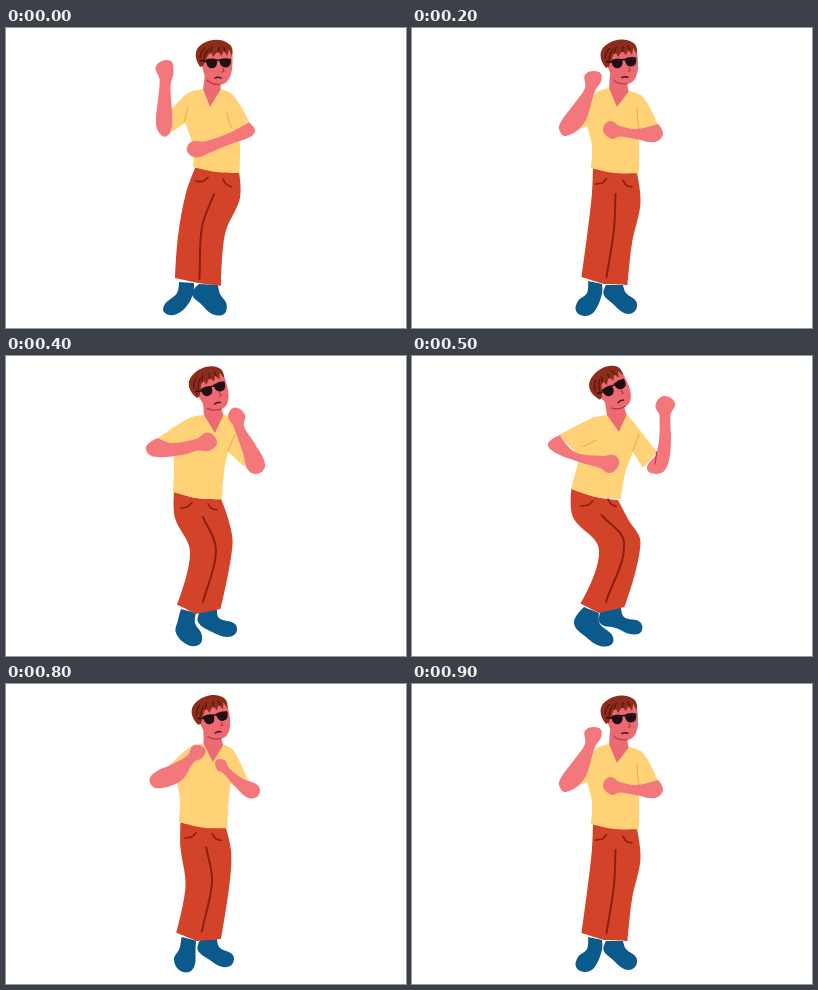
Recreate the animation shown at these times as an HTML page. Size 400x300 px, loop 1 s.

```html
<!DOCTYPE html>
<html lang="en">
<head>
<meta charset="utf-8">
<title>Dancing man</title>
<style>
  html, body { margin: 0; width: 100%; height: 100%; overflow: hidden; background: #fff; }
  svg { display: block; width: 400px; height: 300px; }
</style>
</head>
<body>
<svg id="stage" viewBox="0 0 400 300" stroke-linecap="round" stroke-linejoin="round">
  <defs>
    <g id="head">
      <path fill="#ec6a72" d="M-14-10L0-16 14-11C15-4 14.500 4 13.500 9C12 15 9 21 3 21.500C-4 22-10 18-13 14L-16 3Z"/>
      <path fill="#8c2d1c" d="M-18 4C-24-5-24-14-16-19C-6-25 5-24 11-19C15-16 15-12 14-7L11-13 9-7 6-12 3-7 0-12-5-6-7-11C-11-8-11-4-13-1L-15 3Z"/>
      <path fill="none" stroke="#5c140d" stroke-width="1.300" d="M-18-6Q-17-12-13-15M-14-4Q-13-10-9-14M-8-10L-6-16M0-11L1-16M7-12L6-16"/>
      <path fill="#211013" d="M-12-3.500Q-6-5.500-1-3.500Q0 5-6 5.300Q-12 5.500-12-3.500ZM1.500-4Q8-5.500 13-4Q13.500 4.500 7.500 4.600Q1.500 4.500 1.500-4Z"/>
      <path fill="none" stroke="#211013" stroke-width="1.400" d="M-17-2.500L-11-1.500M-2-2Q0-4 2-2"/>
      <path fill="none" stroke="#b9323d" stroke-width="1.100" d="M-11 17Q-6 22 2 21.500M5 5.500L6 8.500 4 9"/>
      <path fill="none" stroke="#54151c" stroke-width="1.500" d="M-3 15Q0 13.500 3 15"/>
    </g>
  </defs>
</svg>
<script>
const SKIN = '#f4777b', SHOE = '#0c5a8c', DARK = '#8c1f12', FOLD = '#f2b04a';

// Four key poses per part; "!" marks a sharp corner.
const parts = {
  shoeL: { fill: SHOE, poses: [
    '173,254! 188,255! 187,266 180,279 168,287 158,284 159,276 171,265',
    '176,253! 190,256! 190,266 182,284 172,288 164,283 166,273 175,265',
    '175,253! 190,257! 189,267 195.5,278 194,288 182,289 170,277 172,264',
    '172,251! 187,257! 188,268 200,279 200,288 188,290 174,281 162,267'] },
  shoeR: { fill: SHOE, poses: [
    '193,256! 212,257! 214,266 220.5,276 218,286 206,286 195,276 186,266',
    '194,257! 211,257! 214,265 224.5,274 222,284 212,285 200,275 191.5,266',
    '194,255! 211,253! 213,262 229,268 230,277 221,281 206,276 192,266',
    '190,252! 209,250! 212,261 228,266 229,276 218,278 204,272 188,267'] },
  pants: { fill: '#d2432a', poses: [
    '190,138! 211,143 233,144! 234,170 219,206 215,258! 192,255! 169,250! 172,208 180,165',
    '181,139! 203,144 225,145! 228.5,175 220,215 215.5,257! 192,256! 169.5,249! 175,208 180,165',
    '168,135! 190,142 215,143! 222,162 226.5,189 214.5,253! 190,258! 171,248.5! 184,196 169,162',
    '159.5,132! 184,141 206,144! 216,163 228.5,187 212.5,251! 187,257! 168.5,247.5! 187,194 161,161'] },
  seam: { line: DARK, width: 2, poses: [
    '208,166 196,199 193.5,251', '203.5,166 202,201 194.5,249',
    '197,161 210,194 197,246', '189.5,159 212,187 194,246'] },
  pocketL: { line: DARK, width: 1.6, poses: [
    '190,153 196,153.5 202,149.5', '183,156 190,155 194.5,150.5',
    '175,152 181,151 186,146.5', '169,150 176,149 181,144.5'] },
  pocketR: { line: DARK, width: 1.6, poses: [
    '217,151 220,156 225.5,159', '211,152 214,157 220,159',
    '202,148 205,152 211,154', '196,143 199,148 204,150.5'] },
  neck: { fill: '#ec6a72', poses: [
    '199,46! 214,50! 215,64! 204,80! 197,62!', '198,46! 214,50! 217,65! 205,80! 197,61!',
    '197,46! 214,50! 218,60! 209,78! 198,60!', '193,46! 211,48! 215,60! 207,77! 195,60!'] },
  head: { poses: ['212,35 0,0', '211.5,34.5 -5,0', '207,33 -17,0', '202,32 -27,0'] },
  shirt: { fill: '#ffd277', poses: [
    '197,61! 204,79! 215,61! 227,67 244,95! 235,104! 232,106! 234,118 233.5,145! 210,144 187,139! 187,118 179,95! 166,104! 165,82! 182,65',
    '197,60! 205,79! 217,63! 231,69 246,97! 235,103! 227,104! 227,122 227,145! 202,145 179,140! 180,118 175,98! 165,102! 168,88! 184,65',
    '198,59! 209,77! 218,58! 225,65 241,103! 238.5,110.5! 222,96! 218,116 216,143.5! 190,142 167,136! 168,115 167.5,100! 165,88! 151,83! 183,62',
    '195,59! 207,76! 215,58! 223,68 245,96! 231,112! 221,96! 213,118 209,143! 184,141 159,133! 163,118 167,105! 164,97! 147.5,79! 180,62'] },
  foldL: { line: FOLD, width: 1.2, poses: [
    '178,94 180,87 182,79', '', '', '169,91 177,88 184,84'] },
  foldR: { line: FOLD, width: 1.2, poses: [
    '221,85 223,93 226,100', '225,79 225.5,90 227,101',
    '222,95 225,87 229,79', '221,95 224,87 227,78'] },
  armL: { fill: SKIN, poses: [
    '152,103 160,108.5 166,98 164.5,58 167.5,44 164,32.5 150,38 153.5,51 152.5,68 150,90',
    '147,101 154,108 172,95 183,63 189.5,52 187,44 173.5,46 173,60 162,76 150,92',
    '140,91 147,100.5 178,98.5 192,94.5 204,94.5 211,86 202,76.5 190,83 165,87 152,82!',
    '136,88 144,97 170,107 188,112 198,117 207,108 203,99.5 191,100 163,96 148,79!'] },
  armR: { fill: SKIN, poses: [
    '249,102 244,109 222,117 203,125 190,129.5 181,123 185,114 198,113.5 221,106 243,94.5!',
    '251,106 243,114 224,111 207,108.5 200,111 191,102 198,93 208,98 224,101 246,96!',
    '253,117.5 242,114 237,97 227,69.5 222,60 229,51.5 239,59 238,70 249,88 259,108',
    '248,117.5 235,113 245,96 247.5,60 243.5,49 252,40 263,47 258.5,59 259,85 256,108'] },
  elbow: { line: '#b9323d', width: 1.1, poses: ['', '', '', '244.5,96 244,102 243,108'] }
};

const parse = s => s ? s.split(' ').map(p => {
  const [x, y] = p.split(',').map(parseFloat);
  return { x, y, sharp: p.endsWith('!') };
}) : [];

const mix = (a, b) => a.length === b.length ? a.map((p, i) => ({
  x: (p.x + b[i].x) / 2, y: (p.y + b[i].y) / 2, sharp: p.sharp && b[i].sharp
})) : [];

// Smooth curve through the points, with handles scaled to each segment.
function curve(pts, closed) {
  const n = pts.length;
  if (!n) return '';
  const at = i => closed ? pts[(i + n) % n] : pts[Math.max(0, Math.min(n - 1, i))];
  const handle = (i, len) => {
    const p = at(i), a = at(i - 1), b = at(i + 1);
    const k = p.sharp ? 0 : len * 0.35 / (Math.hypot(b.x - a.x, b.y - a.y) || 1);
    return [p.x + (b.x - a.x) * k, p.y + (b.y - a.y) * k];
  };
  let d = `M${pts[0].x} ${pts[0].y}`;
  for (let i = 0; i < n - (closed ? 0 : 1); i++) {
    const p = at(i), q = at(i + 1), len = Math.hypot(q.x - p.x, q.y - p.y);
    d += `C${handle(i, len)} ${handle(i + 1, -len)} ${q.x},${q.y}`;
  }
  return d + (closed ? 'Z' : '');
}

const stage = document.getElementById('stage');
function add(parent, tag, attrs) {
  const el = document.createElementNS('http://www.w3.org/2000/svg', tag);
  for (const k in attrs) el.setAttribute(k, attrs[k]);
  return parent.appendChild(el);
}

// Pose 2 lies halfway between its neighbours.
function pointsFor(part, pose) {
  const key = i => parse(part.poses[i]);
  return pose === 2 ? mix(key(1), key(2)) : key(pose < 2 ? pose : pose - 1);
}

function drawPose(pose) {
  const g = add(stage, 'g', { opacity: 0 });
  for (const [name, part] of Object.entries(parts)) {
    const pts = pointsFor(part, pose);
    if (name === 'head') {
      const [c, turn] = pts;
      add(g, 'use', { href: '#head', transform: `translate(${c.x} ${c.y}) rotate(${turn.x})` });
    } else if (part.fill) {
      add(g, 'path', { d: curve(pts, true), fill: part.fill });
    } else {
      add(g, 'path', { d: curve(pts, false), fill: 'none', stroke: part.line, 'stroke-width': part.width });
    }
  }
  return g;
}

const LOOP = 1000;
const steps = [[0, 0], [200, 1], [300, 2], [400, 3], [500, 4], [700, 3], [800, 2], [900, 1], [LOOP, 0]];

for (let pose = 0; pose < 5; pose++) {
  drawPose(pose).animate(
    steps.map(([t, shown]) => ({ offset: t / LOOP, opacity: +(shown === pose), easing: 'step-end' })),
    { duration: LOOP, iterations: Infinity });
}
</script>
</body>
</html>
```
